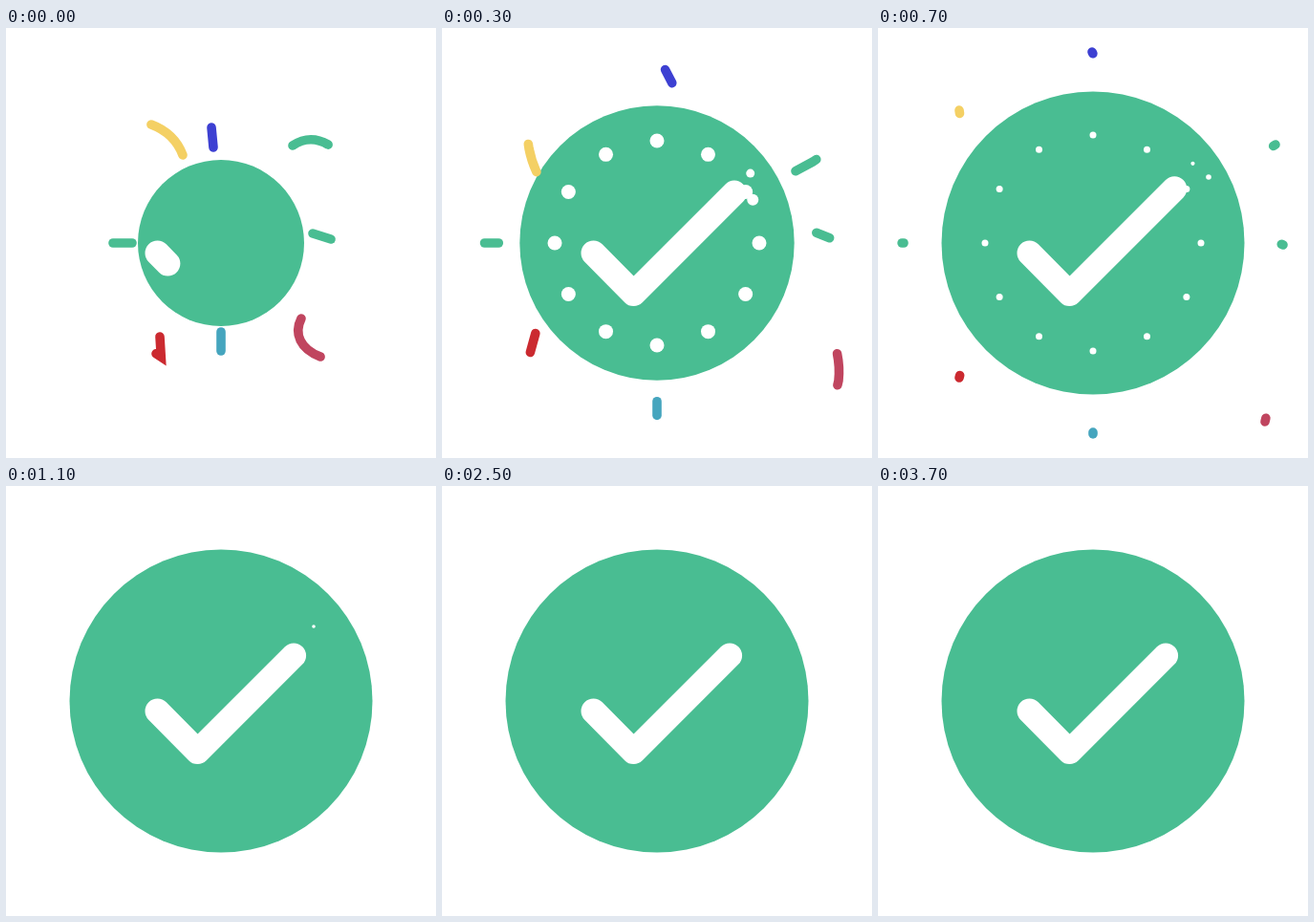
Animation, 450 px wide and 450 px high, one loop 4000 ms. Source, as an HTML page:

```html
<!DOCTYPE html>
<html lang="en">
<head>
<meta charset="utf-8">
<title>Success check</title>
<style>
  html, body { margin: 0; width: 100%; height: 100%; overflow: hidden; background: #fff; }
  svg { display: block; width: 100%; height: 100%; }
</style>
</head>
<body>
<svg id="stage" viewBox="0 0 450 450"></svg>
<script>
const LOOP = 4000, STEP = 100, CENTER = 225;
const GREEN = '#49bd92';
const stage = document.getElementById('stage');

function set(node, attrs) {
  for (const key in attrs) node.setAttribute(key, attrs[key]);
}

function add(tag, attrs) {
  const node = document.createElementNS('http://www.w3.org/2000/svg', tag);
  set(node, attrs);
  return stage.appendChild(node);
}

function addLine(d, stroke, width) {
  return add('path', { d, stroke, fill: 'none', 'stroke-width': width, 'stroke-linecap': 'round' });
}

// Shows only the part of a path between two lengths.
function trim(node, from, to) {
  set(node, { 'stroke-dasharray': `${to - from} 2000`, 'stroke-dashoffset': -from });
}

// Share of an ease-out-cubic move still to go.
const remaining = (t, duration) => Math.max(0, 1 - t / duration) ** 3;

function smoothstep(from, to, t) {
  const p = Math.min(1, Math.max(0, (t - from) / (to - from)));
  return p * p * (3 - 2 * p);
}

const disc = add('circle', { cx: CENTER, cy: CENTER, fill: GREEN });
const dots = Array.from({ length: 12 }, () => add('circle', { fill: '#fff' }));

const check = addLine('M158.5 235.5L200.5 278L324 154.5', '#fff', 26);
set(check, { 'stroke-linejoin': 'round' });

const smallSpark = add('circle', { fill: '#fff' });
const largeSpark = add('circle', { fill: '#fff' });

// Each streamer is a window sliding along a path; its first part is what shows at the start.
const streamers = [
  [GREEN, 'M132 225H112', 'H25'],
  ['#45a5be', 'M225 318V338', 'V425'],
  [GREEN, 'M321 215L340 221', 'C360 227 372 207 391 214L424 227'],
  ['#3d40d2', 'M217 125L215 104', 'C213 84 250 77 241 58L224 25'],
  ['#f4d064', 'M185 133C179 117 168 107 152 101', 'C125 92 121 175 103 159Q94 142 91 126L85 86'],
  [GREEN, 'M300 123Q318 111 337 122', 'C370 143 318 180 362 154L388 140L416 122'],
  ['#cb2a30', 'M161 323L162.3 344.3L157 340.8', 'C110 311 104 298 98 319L85 366'],
  ['#c0455f', 'M309 304C301 320 308 336 329 344', 'C360 357 392 295 411 331Q417 350 415 369L405 412']
].map(([color, first, rest]) => {
  const node = addLine(first, color, 9.6);
  const start = node.getTotalLength();
  set(node, { d: first + rest });
  return { node, start, length: node.getTotalLength() };
});

function render(t) {
  const rest = remaining(t, 735);
  const settle = smoothstep(500, 1000, t);
  set(disc, { r: 158.5 - 71.5 * rest });

  const dotSize = Math.max(0, Math.min(t / 15, 10.5 - t / 100));
  const ring = 113 - 29 * rest;
  dots.forEach((dot, i) => {
    const angle = i * Math.PI / 6;
    set(dot, {
      cx: CENTER + ring * Math.cos(angle), cy: CENTER + ring * Math.sin(angle), r: dotSize
    });
  });

  // The stroke overshoots, then settles back.
  trim(check, 0, 222 - 206.5 * remaining(t, 500) - 20 * settle);

  set(smallSpark, {
    cx: 333.5 - 52 * rest - 11.5 * settle,
    cy: 139 + 63 * rest + 8 * settle,
    r: t > 0 && t < 1200 ? Math.max(1.8, 0.6 * dotSize) : 0
  });
  set(largeSpark, { cx: 346 - 100 * rest, cy: 156 + 115 * rest, r: 0.8 * dotSize });

  for (const { node, start, length } of streamers) {
    const tail = length * (1 - remaining(t, 950));
    const head = length - (length - start) * remaining(t, 765);
    node.style.display = t < 900 ? '' : 'none';
    trim(node, tail, Math.max(head, tail));
  }
}

const began = performance.now();
function tick() {
  const t = (performance.now() - began) % LOOP;
  render(Math.floor(t / STEP) * STEP);
  requestAnimationFrame(tick);
}
tick();
</script>
</body>
</html>
```
